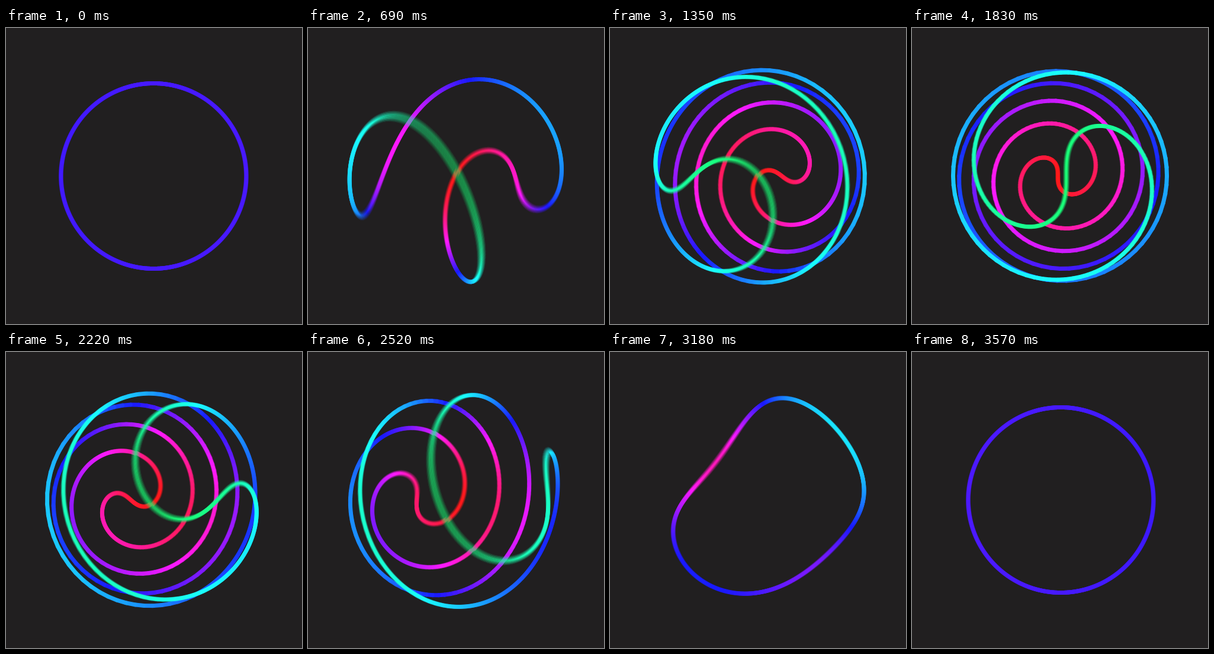
An HTML page with a canvas that plays this animation: 500 px wide and 500 px high, repeating every 3600 ms.

```html
<!DOCTYPE html>
<html lang="en">
<head>
<meta charset="utf-8">
<title>Twisting ring</title>
<style>
  html, body { margin: 0; width: 100%; height: 100%; overflow: hidden; background: #211f20; }
  canvas { display: block; width: 500px; height: 500px; }
</style>
</head>
<body>
<canvas id="stage" width="500" height="500"></canvas>
<script>
const SIZE = 500, MID = 250;
const RADIUS = 156.5, CAMERA = 2;    // camera distance in sphere radii
const STEPS = 120, STEP_MS = 30;
const SHUTTER = 0.6, SAMPLES = 9;    // motion blur
const SEGMENTS = 600, TWIST = 3 * Math.PI;
const BACK = '#211f20';

const out = document.getElementById('stage').getContext('2d');
const layer = document.createElement('canvas');
layer.width = layer.height = SIZE;
const pen = layer.getContext('2d');
pen.lineWidth = 7;
pen.lineCap = 'round';

const ease = q => q * q * q * (10 - 15 * q + 6 * q * q);

// Great circle twisted about its own x axis, then tumbled about the vertical.
function project(u, twist, cosA, sinA) {
  const c = Math.cos(u), s = Math.sin(u);
  const y = -s * Math.cos(twist * c), w = s * Math.sin(twist * c);
  const x = c * cosA + w * sinA, z = w * cosA - c * sinA;
  const k = RADIUS * CAMERA / (CAMERA - z);
  return { x: MID + x * k, y: MID + y * k, z };
}

function drawCurve(t) {
  const angle = Math.PI * t;
  const cosA = Math.cos(angle), sinA = Math.sin(angle);
  const twist = TWIST * ease(1 - Math.abs(1 - 2 * t));
  const points = [];
  for (let i = 0; i <= SEGMENTS; i++) {
    points.push(project(2 * Math.PI * i / SEGMENTS, twist, cosA, sinA));
  }
  const parts = [];
  for (let i = 0; i < SEGMENTS; i++) {
    const a = points[i], b = points[i + 1];
    parts.push({ a, b, z: (a.z + b.z) / 2 });
  }
  parts.sort((p, q) => p.z - q.z);

  pen.fillStyle = BACK;
  pen.fillRect(0, 0, SIZE, SIZE);
  for (const { a, b, z } of parts) {
    pen.strokeStyle = `hsl(${(252 - 108 * z).toFixed(1)}, 100%, 55%)`;
    pen.beginPath();
    pen.moveTo(a.x, a.y);
    pen.lineTo(b.x, b.y);
    pen.stroke();
  }
}

// Running average of the curve over the time the shutter is open.
function render(step) {
  for (let i = 0; i < SAMPLES; i++) {
    drawCurve((step + SHUTTER * (i + 0.5) / SAMPLES) / STEPS);
    out.globalAlpha = 1 / (i + 1);
    out.drawImage(layer, 0, 0);
  }
}

const start = performance.now() - 3;
let shown = -1;

function tick() {
  const step = Math.floor((performance.now() - start) / STEP_MS) % STEPS;
  if (step !== shown) {
    shown = step;
    render(step);
  }
  requestAnimationFrame(tick);
}
tick();
</script>
</body>
</html>
```
